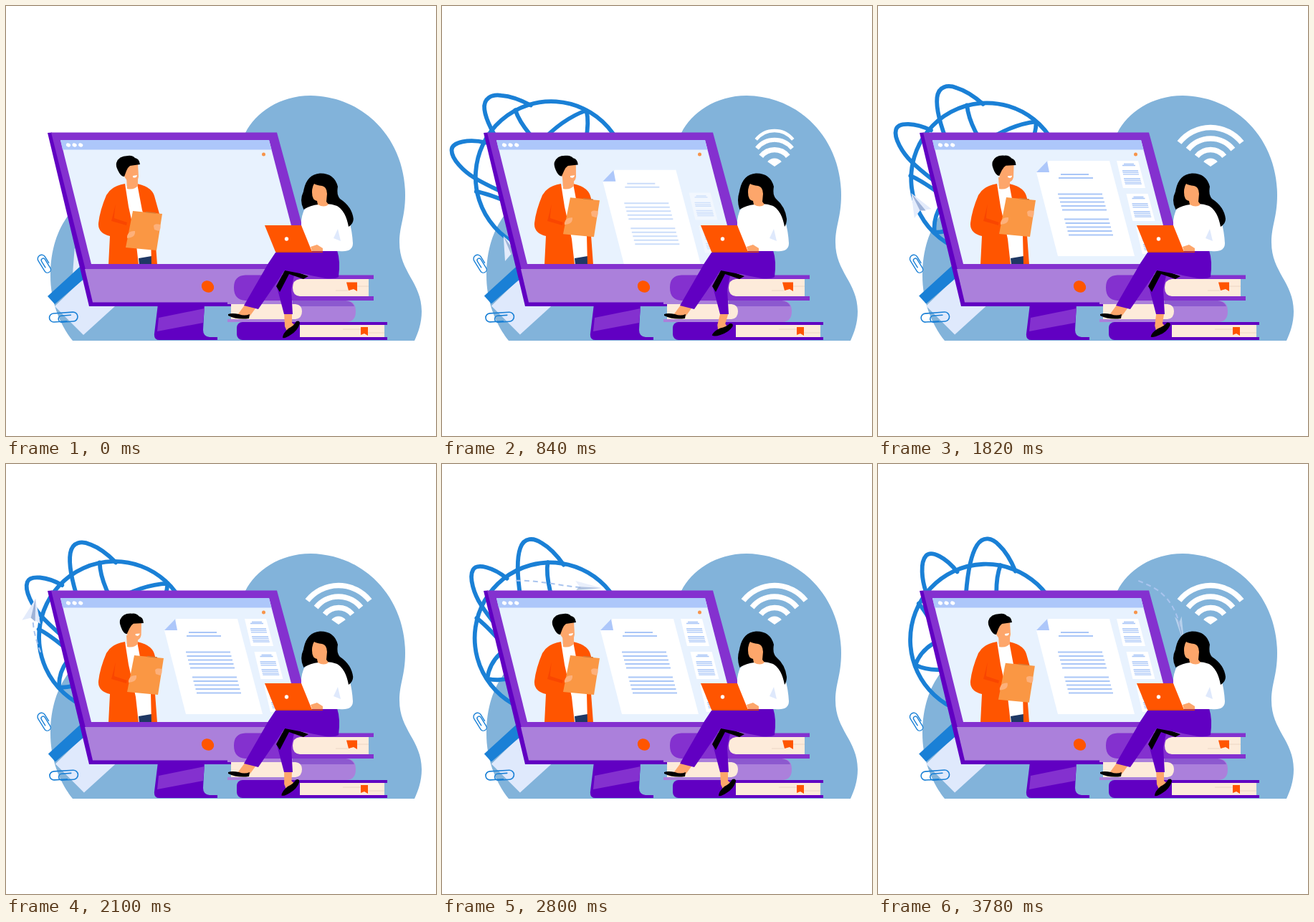
An HTML page that plays this animation: 600 by 600 pixels, repeating every 3920 ms.

```html
<!DOCTYPE html>
<html lang="en">
<head>
<meta charset="utf-8">
<title>Online lesson</title>
<style>
  html, body { margin: 0; width: 100%; height: 100%; overflow: hidden; background: #fff; }
  svg { display: block; width: 100vw; height: 100vh; }
  .line { fill: none; stroke: #1a80d6; stroke-linecap: round; stroke-linejoin: round; }
  .text { fill: none; stroke: #a9c6f7; stroke-width: 2; }
  .deep { fill: #6100c2; }
  .mid { fill: #8431cf; }
  .soft { fill: #ab80db; }
  .cream { fill: #fdebda; }
  .hot { fill: #ff5500; }
  .skin { fill: #fda66b; }
  .white { fill: #fff; }
</style>
</head>
<body>
<svg viewBox="0 0 600 600">
  <defs>
    <clipPath id="screen"><path d="M76 187H367L412 360H119Z"/></clipPath>
    <path id="route" d="M102 356C90 320 60 290 48 262C30 215 34 185 68 168C130 150 190 185 235 168C290 150 340 150 375 168C405 180 420 205 426 250"/>
  </defs>

  <path fill="#82b3da" d="M93 467C74 443 62 411 62 376C62 340 72 312 87 292L334 177C348 149 382 125 425 125C500 126 557 186 557 264C557 295 549 306 549 330C549 371 580 386 580 426C580 443 575 456 570 467Z"/>

  <g id="globe" class="line" stroke-width="5.8">
    <circle r="105.500"/>
    <path d="M-50-8L-64-28C-80-48-96-72-99-88C-102-104-90-110-77-109C-64-109-48-104-35-98"/>
    <path d="M-94-42C-118-46-141-40-141-29C-141-16-122 0-107 8C-92 16-80 20-60 28"/>
    <path d="M-103 27C-94 28-84 30-60 38M-56-90Q-50-75-34-58L-15-40"/>
    <path d="M-20-45Q10-82 43-96Q48-80 45-55"/>
    <path d="M-40 30L-50 54Q-56 74-48 93Q-32 88-19 75L0 55"/>
  </g>

  <path id="trail" fill="none" stroke="#a9c4ee" stroke-width="2"/>
  <g id="plane">
    <path fill="#e3ebfb" d="M19 0L-13-14L-8-2L-14 13Z"/>
    <path fill="#9db2d8" d="M19 0L-8-2L-12 5Z"/>
  </g>

  <g id="sheet">
    <path fill="#dfe9fc" d="M68 419L110 378L152 419L108 459Z"/>
    <path fill="#1a80d6" d="M58 405L104 363L112 378L68 416Z"/>
  </g>
  <g id="clipA" class="line" stroke-width="1.4">
    <path d="M2-5.500H-8A5.500 5.500 0 0 0-8 5.500H9A4.500 4.500 0 0 0 9-3.500H-5A2.500 2.500 0 0 0-5 2H5"/>
  </g>
  <g id="clipB" class="line" stroke-width="1.6">
    <path d="M4 6H-14A6 6 0 0 1-14-6H13A6.500 6.500 0 0 1 13 7H-3A4.500 4.500 0 0 1-3-2H10"/>
  </g>

  <g id="wifi" fill="none" stroke="#fff" stroke-width="7.5"></g>

  <!-- monitor -->
  <path class="deep" d="M212 416H277L275 452Q275 461 284 462H295V466H214Q206 466 207 457Z"/>
  <path class="mid" d="M213 435L277 422L275 442L211 454Z"/>
  <path class="deep" d="M58 177L64 176.500L125 413H440V419H116Z"/>
  <path class="mid" d="M63 176.500H378L430 368H111Z"/>
  <path class="soft" d="M110 367H430L442 413.500H121Z"/>
  <path fill="#e8f2fe" d="M76 187H367L412 360H119Z"/>
  <path fill="#adc7fa" d="M76 187H367L370.500 200.500H79Z"/>
  <g id="dots" class="white"></g>
  <circle cx="359.500" cy="207" r="2.500" fill="#f7944a"/>
  <ellipse class="hot" cx="281.500" cy="391.500" rx="9" ry="8" transform="rotate(35 281.500 391.500)"/>

  <g clip-path="url(#screen)">
    <g id="doc">
      <path class="white" d="M238 216H323L358 349H251L221 232Z"/>
      <path fill="#adc7fa" d="M221 232L236 216.500L239 232Z"/>
      <path id="lines" class="text"/>
    </g>
    <g id="thumbs"></g>
  </g>

  <!-- teacher -->
  <g clip-path="url(#screen)">
    <path class="white" d="M163 252L185 249L204 300V362H176Z"/>
    <path fill="#1f3864" d="M185 352L203 349V361H186Z"/>
    <path class="hot" d="M166 248Q147 251 140 264Q131 285 129 303Q128 317 145 321L143 361H185L181 325L171 280Z"/>
    <path class="hot" d="M183 248Q203 252 207 265L214 290L208 320L211 361H203L202 320L190 285Z"/>
    <path fill="#f94600" d="M153 276Q151 291 151 296L169 302L168 306L147 300Z"/>
  </g>
  <path class="skin" d="M168 239H184V251Q178 257 169 255Z"/>
  <g id="head">
    <path class="skin" d="M164 220H184L185 238Q184 246 177 246Q166 245 164 234Z"/>
    <path d="M156 229Q153 223 154 219Q157 209 170 209Q176 208 180 212Q186 213 187 221L173 223Q170 225 168 230L165 238Q160 238 156 229Z"/>
    <path class="white" d="M177 237L183 236Q182 241 177 239Z"/>
  </g>
  <g id="board">
    <path fill="#fa9744" d="M179 267L220 271L212 322L169 318Z"/>
    <path d="M197 268.500L211 270" stroke="#d87a35" stroke-width="1.500"/>
    <path fill="#fdb07a" d="M171 302Q173 294 182 295Q183 302 176 304L171 305ZM208 288Q209 284 217 286Q219 291 215 295L209 293Z"/>
  </g>

  <!-- books -->
  <rect class="deep" x="322" y="441" width="110" height="25" rx="8"/>
  <path class="deep" d="M340 441H532V445H340ZM340 462H532V466H340Z"/>
  <path class="cream" d="M410 445H528V462H410Z"/>
  <path class="soft" d="M309 411H474Q488 411 488 426Q488 441 474 441H309V437H400V416H309Z"/>
  <path fill="#8c59cf" d="M400 411H474Q483 412 486 419H400Z"/>
  <path class="cream" d="M314 416H404Q413 417 413 426Q413 436 404 437H314Z"/>
  <path class="mid" d="M334 375.500H513V381H440V405H513V411H334Q318 410 318 393Q318 376 334 375.500Z"/>
  <path class="cream" d="M410 381H506V405H410Q400 404 400 393Q400 382 410 381Z"/>
  <path class="hot" d="M475 385.500H490V398L485 395L478 397Z"/>
  <path class="hot" d="M495 448H505V460L500 457L495 459Z"/>
  <path fill="none" stroke="#ecd6c4" d="M490 391H506M460 397H477M470 451H495M505 456H528M314 430H330"/>

  <!-- student -->
  <g id="foot">
    <path class="skin" d="M388 426H399L399 442L405 447L393 456L389 447Z"/>
    <path d="M386 463Q386 457 394 450Q402 446 405 440Q410 438 410 443Q407 453 397 459Q390 464 386 463Z"/>
  </g>
  <path class="deep" d="M392 366L378 392L388 430H400L398 395L402 376Z"/>
  <path d="M390 367L377 391L382 399L395 374L415 381L422 377L394 367Z"/>
  <path class="skin" d="M334 416L348 422L340 433L323 431Z"/>
  <path d="M310 430Q315 428 325 430Q333 433 340 430L339 436Q322 438 310 432Z"/>
  <path class="deep" d="M376 344Q382 341 392 341H462Q467 356 464 378Q460 381 446 380L389 369L352 423L332 418L366 359Z"/>
  <path class="white" d="M436 276Q419 277 415 287Q410 300 413 312L424 342H465Q484 344 484 331Q482 297 469 281Q462 276 450 276Z"/>
  <path fill="#dfe9fc" d="M463 311L457 324L467 328Z"/>
  <path class="skin" d="M425 336L434 333L442 338V342H427Z"/>
  <path class="hot" d="M361 306H412L427 343H376Z"/>
  <path fill="#d94a10" d="M376 342.500H442V344H377Z"/>
  <circle class="white" cx="391.500" cy="325" r="2.700"/>
  <path id="hair"/>
  <path class="skin" d="M430 248Q433 250 441 251Q448 253 448 262L447 273L450 277Q444 282 435 277L434 272Q427 271 427 260Q427 252 430 248Z"/>
</svg>

<script>
const LOOP = 3920, STEP = 140;
const $ = id => document.getElementById(id);
const set = (id, name, value) => $(id).setAttribute(name, value);
const move = (id, value) => set(id, 'transform', value);
const clamp = v => Math.max(0, Math.min(1, v));
const ramp = (t, from, to) => clamp((t - from) / (to - from));
const smooth = (t, from, to) => {
  const u = ramp(t, from, to);
  return u * u * (3 - 2 * u);
};
const wave = (t, peak) => Math.cos((t - peak) / LOOP * 4 * Math.PI);

// Slanted block of text lines.
const rows = (x, y, width, count, dx, dy) =>
  Array.from({ length: count }, (_, i) => `M${x + dx * i} ${y + dy * i}h${width}`).join('');

set('lines', 'd', 'M255 235h39M252 240h48'
  + rows(251, 262.5, 62, 5, 1.5, 5.5)
  + rows(260, 297.5, 62, 5, 1.5, 5.5));

for (let i = 0; i < 3; i++) {
  const x = 87 + 8.6 * i;
  $('dots').innerHTML += `<ellipse cx="${x}" cy="194" rx="3.2" ry="2.5" transform="rotate(25 ${x} 194)"/>`;
  $('thumbs').innerHTML += `<g transform="translate(${333 + 13.5 * i} ${216 + 46 * i})">
    <path class="white" d="M0 0h30l10 38h-31z"/>
    <path class="text" style="stroke-width:1.3" d="M10 4.500h14M8 6.500h18${rows(8, 14, 22, 3, 0.5, 2.4)}${rows(10, 25, 23, 4, 0.6, 2.4)}"/>
  </g>`;
}

const radius = i => i ? 9 + 15.5 * i : 12.5;
for (let i = 0; i < 4; i++) {
  const r = radius(i), x = 0.784 * r, y = -0.621 * r;
  const arc = `M${-x} ${y}A${r} ${r} 0 0 1 ${x} ${y}`;
  $('wifi').innerHTML += i ? `<path d="${arc}"/>` : `<path d="${arc}L0 -1Z" fill="#fff" stroke="none"/>`;
}

// Distance flown: a slow take-off, then steady speed.
const flown = t => t < 1820 ? 91 * (t / 1820) ** 2 : 91 + 0.265 * (t - 1820);
const point = s => $('route').getPointAtLength(s);
const spot = s => `${point(s).x.toFixed(1)} ${point(s).y.toFixed(1)}`;

function drawPlane(t) {
  const s = flown(t), p = point(s), q = point(s + 4);
  const angle = Math.atan2(q.y - p.y, q.x - p.x) * 180 / Math.PI;
  const thin = smooth(t, 1820, 3780);
  move('plane', `translate(${p.x} ${p.y}) rotate(${angle}) scale(${1 + 0.3 * thin} ${1 - 0.65 * thin})`);
  set('plane', 'opacity', 1 - 0.45 * thin);

  let dashes = '';
  for (let k = Math.ceil((s - 105) / 12) * 12; k + 7 < s; k += 12) {
    if (k > 100) dashes += `M${spot(k)}L${spot(k + 7)}`;
  }
  set('trail', 'd', dashes);
}

function drawWifi(t) {
  [...$('wifi').children].forEach((bar, i) => {
    const p = ramp(t, 140 + 115 * i, 740 + 115 * i), mid = radius(i) * 0.8;
    bar.setAttribute('transform', `translate(464 ${225 - mid}) scale(${p}) translate(0 ${mid})`);
    bar.setAttribute('opacity', Math.min(1, p * 2.5));
  });
}

function slideIn(id, t, from, to, depth) {
  const y = depth * (1 - smooth(t, from, to));
  move(id, `translate(${y * 0.26} ${y})`);
  set(id, 'opacity', smooth(t, from, (from + to) / 2 + 100));
}

function draw(t) {
  const turn = (t - 560) * 0.01335;
  move('globe', `translate(${152.5 - turn / 22} ${238 + turn / 6}) rotate(${turn}) scale(${1 - (1 - ramp(t, 0, 520)) ** 3})`);
  set('globe', 'visibility', t ? 'visible' : 'hidden');
  drawPlane(t);
  drawWifi(t);
  slideIn('doc', t, 200, 980, 150);
  set('lines', 'opacity', ramp(t, 600, 1000));
  slideIn('thumbs', t, 700, 1120, 60);

  const nod = smooth(t, 560, 1120) - smooth(t, 1960, 2660);
  move('head', `translate(${nod * 3.2} 0) rotate(${nod * 5} 176 248)`);
  const drop = 1 - smooth(t, 0, 900) + smooth(t, 3400, 4100);
  move('board', `translate(${-2 * drop} ${19 * drop})`);

  const tap = Math.sin(Math.PI * ramp(t, 0, 2380)) ** 2;
  move('foot', `rotate(${21 * tap} 393 430)`);
  const w = 2 + 2 * wave(t, 1820);
  set('hair', 'd', `M415 283Q${411 - w / 2} 271 415 259Q419 235 438 233.500Q458 233 463 252Q461 264 466 269Q${479 + w} 280 ${481 + w} 297Q${481 + w} 304 478 308Q474 286 462 279Q450 274 436 277Q425 278 415 284Z`);

  const drift = 2 * wave(t, 490);
  move('sheet', `translate(${drift} ${-Math.abs(drift) / 2})`);
  move('clipA', `translate(${54 - drift / 4} 359.500) rotate(58)`);
  move('clipB', `translate(${80.5 + drift / 2} 434) rotate(${-4 + drift / 2})`);
}

const start = performance.now();
function tick(now) {
  const t = Math.max(0, now - start) % LOOP;
  draw(Math.floor(t / STEP) * STEP);
  requestAnimationFrame(tick);
}
draw(0);
requestAnimationFrame(tick);
</script>
</body>
</html>
```
